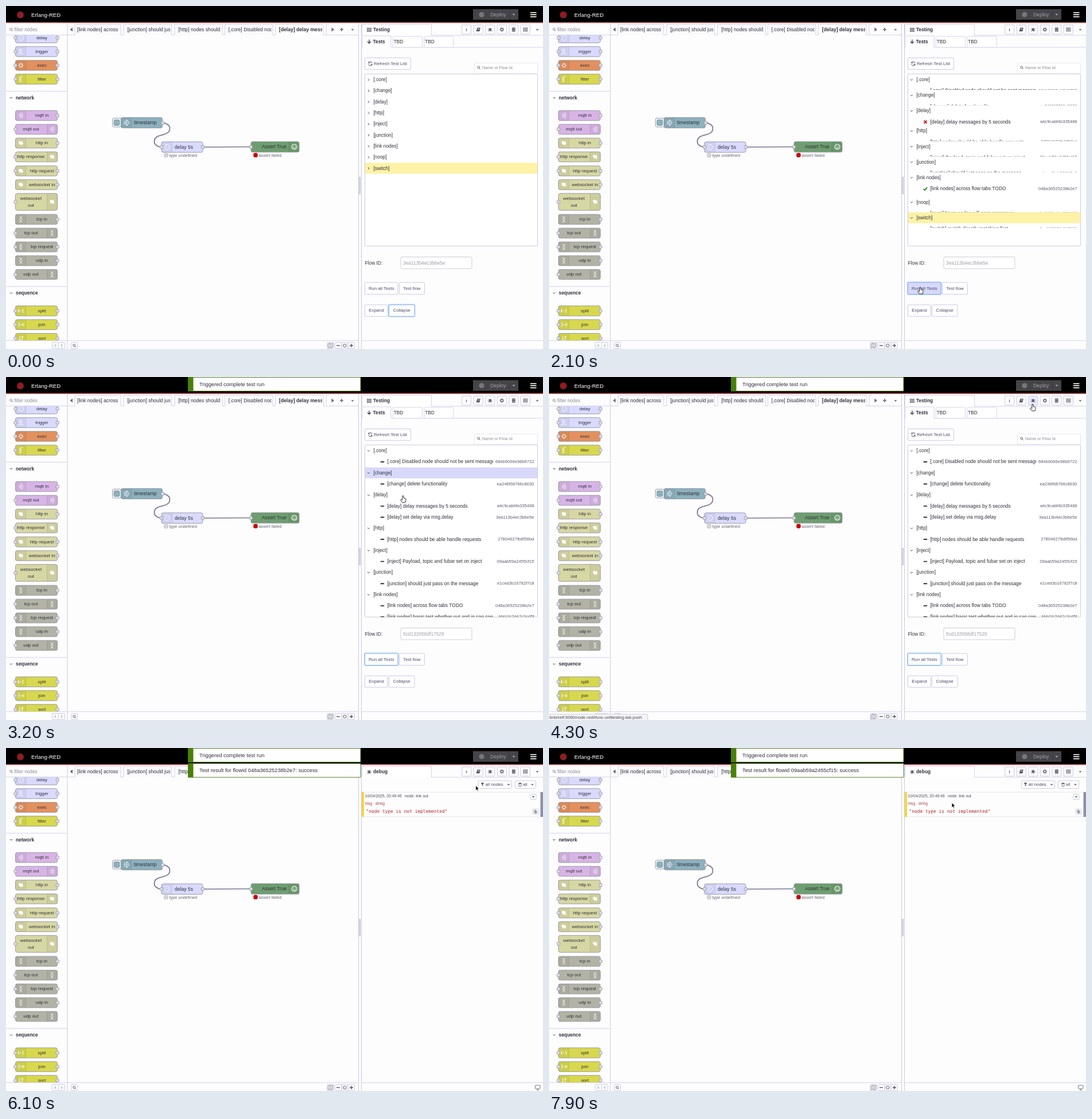
Write an HTML page with a canvas that moves like this. It is 936 by 598 pixels and loops after 8000 ms.

```html
<!DOCTYPE html>
<html lang="en">
<head>
<meta charset="utf-8">
<title>Flow editor test run</title>
<style>
html, body { margin: 0; width: 100%; height: 100%; overflow: hidden; background: #fdfdfe; }
canvas { display: block; width: 936px; height: 598px; }
</style>
</head>
<body>
<canvas id="stage"></canvas>
<script>
const W = 936, H = 598, LOOP = 8000;
const stage = document.getElementById('stage'), c = stage.getContext('2d');
const dpr = window.devicePixelRatio || 1;
stage.width = W * dpr;
stage.height = H * dpr;

const SANS = '"Liberation Sans", Arial, sans-serif', MONO = '"DejaVu Sans Mono", monospace';
const LINE = '#d3d3ec', EDGE = '#c4c4e4', INK = '#30303c', BG = '#fdfdfe', HOVER = '#d8d8fb', FOCUS = '#7fb0f5';

// --- drawing helpers ---
function text(s, x, y, size = 8.4, color = INK, o = {}) {
  c.font = `${o.bold ? 'bold ' : ''}${size}px ${o.mono ? MONO : SANS}`;
  c.textAlign = o.align || 'left';
  c.textBaseline = 'middle';
  c.fillStyle = color;
  c.fillText(s, x, y);
}
function rect(x, y, w, h, fill) {
  c.fillStyle = fill;
  c.fillRect(x, y, w, h);
}
function box(x, y, w, h, fill, stroke = EDGE, r = 1, lw = 0.9) {
  c.beginPath();
  c.roundRect(x, y, w, h, r);
  if (fill) { c.fillStyle = fill; c.fill(); }
  c.strokeStyle = stroke;
  c.lineWidth = lw;
  c.stroke();
}
function disc(x, y, r, fill) {
  c.fillStyle = fill;
  c.beginPath();
  c.arc(x, y, r, 0, 7);
  c.fill();
}
function path(d, x, y, stroke, lw = 1, fill, scale = 1) {
  const p = new Path2D(d);
  c.save();
  c.translate(x, y);
  c.scale(scale, scale);
  if (fill) { c.fillStyle = fill; c.fill(p); }
  if (stroke) { c.strokeStyle = stroke; c.lineWidth = lw; c.stroke(p); }
  c.restore();
}
function clipped(x, y, w, h, draw) {
  c.save();
  c.beginPath();
  c.rect(x, y, w, h);
  c.clip();
  draw();
  c.restore();
}
const hline = (x, y, x2, color = LINE) => rect(x, y, x2 - x, 1, color);
const vline = (x, y, y2, color = LINE) => rect(x, y, 1, y2 - y, color);
const caret = (x, y, color = '#666678') => path('M-2.5-1.2H2.5L0 1.6Z', x, y, null, 0, color);
const chevron = (x, y, open) => path(open ? 'M-2-1L0 1 2-1' : 'M-1-2L1 0-1 2', x, y, '#444454', 1);
const swing = x => 0.5 - Math.cos(Math.PI * Math.min(1, Math.max(0, x))) / 2;

const ICON = {
  clock: 'M-3-3.4A4.5 4.5 0 1 1-4.5 0M0 .5L-3-2.5',
  pulse: 'M-5 4H-2V-4H1V4H4',
  gear: 'M-2.6 0A2.6 2.6 0 1 0 2.6 0A2.6 2.6 0 1 0-2.6 0M0-4.5V-2.6M0 4.5V2.6M-4.5 0H-2.6M4.5 0H2.6M-3.2-3.2L-2-2M3.2 3.2L2 2M3.2-3.2L2-2M-3.2 3.2L-2 2',
  filter: 'M3-4.5H0V4.5H-3M-2-4.5V3',
  waves: 'M-3-2.5Q-1 0-3 2.5M-1-4Q2 0-1 4M1-5.5Q5 0 1 5.5',
  globe: 'M-4.5-1L-2-4 1-2.5 3.5-3.5 2.5-1 4 0 2 4 0 2-1 3.5Z',
  bridge: 'M-2.5-5.5Q1-2.5-2.5 0Q1 2.5-2.5 5.5M2-5.5Q-1.5-2.5 2 0Q-1.5 2.5 2 5.5',
  split: 'M-5-2.5V2.5M-3.5-2.5V2.5M-1 0H1M2-2.5H5M2 0H5M2 2.5H5',
  join: 'M-5-2.5H-2M-5 0H-2M-5 2.5H-2M-1 0H1.5M3-2.5V2.5M5-2.5V2.5',
  sort: 'M-2-4V4M-4 2L-2 4 0 2M2.5 4V-4M.5-2L2.5-4 4.5-2',
  arrow: 'M-4.5-2.4H.3V-5.5L4.5 0 .3 5.5V2.4H-4.5M-4.5 0H2.5',
  lens: 'M-2.2-.5A1.9 1.9 0 1 0 1.6-.5A1.9 1.9 0 1 0-2.2-.5M1 1L2.8 2.8',
  bug: 'M-3.5-2.4L-1.5-1M3.5-2.4L1.5-1M-4 .7H4M-3.5 3.5L-1.5 2M3.5 3.5L1.5 2',
  grid: 'M-4-2.5H-1.6M-1.2-2.5H1.2M1.6-2.5H4M-4 0H-1.6M-1.2 0H1.2M1.6 0H4M-4 2.5H-1.6M-1.2 2.5H1.2M1.6 2.5H4',
  tick: 'M-3.2.2L-1 2.3 3.2-2.3',
  cross: 'M-2.4-2.6L2.4 2.6M2.4-2.6L-2.4 2.6',
  dash: 'M-3.2 0H3.2',
  hand: 'M-1.1 1Q0-1 1.1 1V4.2L4.2 5.3Q5.6 6 5 8.4L4 12H-1.4L-4.4 7.6Q-4.2 5.8-1.1 7.6Z',
  pointer: 'M0 0V9.2L2 7.4 3.4 10.4 4.9 9.7 3.5 6.7H6.2Z'
};
function bug(x, y) {
  path(ICON.bug, x, y, '#555566', 0.8);
  path('M-1.6-1.2Q0-4.6 1.6-1.2V1.8Q0 4.4-1.6 1.8Z', x, y, null, 0, '#555566');
}

// --- static editor ---
const LILAC = '#dadaff', SAND = '#d7d7a4', GREY = '#b2b2a5', LIME = '#d8d84e', PINK = '#d8b4e6';
const palette = [
  [55.5, 'delay', LILAC, 'clock', 'io'], [79.5, 'trigger', LILAC, 'pulse', 'io'],
  [103.5, 'exec', '#e2905e', 'gear', 'io'], [127.5, 'filter', LIME, 'filter', 'io'],
  [191, 'mqtt in', PINK, 'waves', 'o'], [215, 'mqtt out', PINK, 'waves', 'i'],
  [239, 'http in', SAND, 'globe', 'o'], [263, 'http response', SAND, 'globe', 'i'],
  [287.5, 'http request', SAND, 'globe', 'io'], [311.5, 'websocket in', SAND, 'globe', 'o'],
  [341.5, 'websocket\nout', SAND, 'globe', 'i'],
  [372, 'tcp in', GREY, 'bridge', 'o'], [396, 'tcp out', GREY, 'bridge', 'i'],
  [420, 'tcp request', GREY, 'bridge', 'io'], [444, 'udp in', GREY, 'bridge', 'o'],
  [468, 'udp out', GREY, 'bridge', 'i'],
  [531.5, 'split', LIME, 'split', 'io'], [555.5, 'join', LIME, 'join', 'io'], [579.5, 'sort', LIME, 'sort', 'io']
];
const port = (x, y) => box(x - 2.7, y - 2.7, 5.4, 5.4, '#dcdce4', '#9292a4', 1.5, 0.8);

function nodeShape(x, y, w, h, color, icon, right) {
  box(x, y - h / 2, w, h, color, '#9494a2', 3, 0.9);
  const ix = right ? x + w - 18.5 : x;
  rect(ix, y - h / 2 + 0.4, 18.5, h - 0.8, 'rgba(0,0,0,.05)');
  vline(right ? ix : ix + 18, y - h / 2 + 1, y + h / 2 - 1, 'rgba(0,0,0,.08)');
  const solid = icon === 'globe';
  path(ICON[icon], ix + 9.5, y, solid ? null : 'rgba(255,255,255,.9)', 1, solid ? '#fff' : null);
}
function drawPalette() {
  clipped(0, 51, 107, 532, () => {
    for (const [y, label, color, icon, ports] of palette) {
      const lines = label.split('\n'), right = ports === 'i';
      nodeShape(16.5, y, 73, lines.length > 1 ? 29.5 : 17.5, color, icon, right);
      lines.forEach((s, i) =>
        text(s, right ? 43.5 : 62.5, y + (i - (lines.length - 1) / 2) * 12 + 0.2, 7.9, INK, { align: 'center' }));
      if (ports.includes('i')) port(16.5, y);
      if (ports.includes('o')) port(89.7, y);
    }
    for (const [y, name] of [[160, 'network'], [500.5, 'sequence']]) {
      hline(0, y - 12, 107);
      chevron(9, y, true);
      text(name, 17, y + 0.3, 8.4, INK, { bold: true });
    }
  });
  path(ICON.lens, 9, 41, '#777788', 0.9);
  text('filter nodes', 14.5, 41.3, 8.2, '#8c8c96');
  hline(0, 50, 107);
  vline(106.5, 30, H, '#c9c9dc');
  box(80.5, 586.5, 11, 10.5, '#fff');
  box(91.5, 586.5, 11, 10.5, '#fff');
  path('M-1.5-.4L0-1.8 1.5-.4M-1.5 1.8L0 .4 1.5 1.8', 86, 592, '#666677', 0.7);
  path('M-1.5-1.8L0-.4 1.5-1.8M-1.5.4L0 1.8 1.5.4', 97, 592, '#666677', 0.7);
}
function drawHeader() {
  rect(0, 0, W, 28, '#000');
  rect(0, 28, W, 1.4, '#b82222');
  disc(25, 15.5, 6, '#8f1d22');
  text('Erlang-RED', 44, 16.3, 9.6, '#fff');
  rect(814, 5.5, 79, 18.5, '#444449');
  vline(877, 6, 24, '#38383c');
  disc(829, 15, 4.5, '#77777a');
  text('Deploy', 844, 15.3, 8.8, '#a0a0a4');
  caret(885, 15, '#aaaaae');
  for (const y of [10.7, 14.3, 17.9]) rect(914, y, 10.5, 1.7, '#fff');
}
function drawTabs() {
  hline(107, 50, 615);
  path('M2-3.5V3.5L-2.5 0Z', 114, 41, null, 0, '#666678');
  const tabs = [
    [120, '[link nodes] across flow tabs'], [205, '[junction] should just pass'],
    [294, '[http] nodes should be able'], [381.5, '[.core] Disabled node'], [469.5, '[delay] delay messages']
  ];
  tabs.forEach(([x, s], i) => {
    const active = i === 4, w = i ? 83.5 : 80;
    path(`M0 19V0H${w}V19`, x, 32, LINE, 1, active ? '#fff' : '#fbfbfe');
    if (active) rect(x + 0.6, 50, w - 1.2, 1, '#fff');
    clipped(x, 32, w - 2, 18, () => text(s, x + (i ? 6.3 : 4), 41.8, 8.65, INK, { bold: active }));
  });
  path('M0 19V0H5', 558, 32, LINE);
  path('M-2-3.5V3.5L2.5 0Z', 569.5, 41, null, 0, '#666678');
  path('M-3 0H3M0-3V3', 585, 41, '#666678', 1.6);
  caret(604, 41.5);
}
function drawFlow() {
  const wire = '#77778e';
  path('M273 203.7C279 203.7 285.5 208.2 285.5 212.7S285.5 221.7 272 224.8S258.5 232.5 258.5 237S264.7 246 271 246',
    0, 0, wire, 1.7);
  path('M343 246L427 245.5', 0, 0, wire, 1.7);
  box(185.5, 195.5, 15, 15.5, '#f6f6fb', '#9494a2', 2.5);
  box(188, 198.3, 10, 10, '#8db0be', '#7897a3', 2);
  nodeShape(200.5, 203.5, 72, 18.3, '#8db0be', 'arrow');
  text('timestamp', 223, 203.9, 8.6);
  port(273, 203.7);
  nodeShape(271, 246, 72, 18.3, LILAC, 'clock');
  text('delay 5s', 294, 246.4, 8.6);
  port(271, 246);
  port(343, 246);
  nodeShape(427, 245.7, 84, 18.3, '#6e9e70', null, true);
  path('M-4.5 0A4.5 4.5 0 1 0 4.5 0A4.5 4.5 0 1 0-4.5 0M-2.4 1Q0 4 2.4 1M-1.6-2V-.6M1.6-2V-.6', 502.5, 245.5, '#fff', 1.1);
  text('Assert True', 446, 246, 8.4);
  port(427, 245.7);
  box(275.7, 257, 6.6, 6.6, '#d6d6d6', '#c4c4c4', 1.5);
  text('type undefined', 284.5, 261, 7.4, '#666672');
  box(431.8, 256.7, 6.4, 6.6, '#cc0000', '#b80000', 1.5);
  text('assert failed', 440.5, 260.7, 7.4, '#666672');
}
function drawFrame() {
  hline(107, 583, 615);
  hline(0, 583, 107);
  box(113.5, 586.5, 11, 11, '#fff');
  path(ICON.lens, 119, 592, '#555566', 1);
  [560, 573.5, 585, 596.5].forEach(x => box(x, 586.5, 11, 11, '#fff'));
  path('M-4-3L-1.3-4 1.3-3 4-4V3L1.3 4-1.3 3-4 4ZM-1.3-4V3M1.3-3V4', 565.5, 592, '#666677', 0.7);
  path('M-3 0H3', 579, 592, '#555566', 1.4);
  path('M-2.7 0A2.7 2.7 0 1 0 2.7 0A2.7 2.7 0 1 0-2.7 0', 590.4, 592, '#555566', 1);
  path('M-3 0H3M0-3V3', 602, 592, '#555566', 1.4);
  vline(614, 30, H, '#c9c9dc');
  vline(619, 30, H, '#c9c9dc');
  box(616, 298, 1.4, 30, '#fff', '#a8a8ba', 0.5, 0.8);
}

// --- sidebar ---
function drawSideHead(debug, cur) {
  path('M0 19V0H121V19', 620.5, 32, LINE, 1, '#fff');
  hline(741, 50.5, W);
  if (debug) bug(633, 41.5);
  else path(ICON.grid, 633, 41.5, '#444455', 1.7);
  text(debug ? 'debug' : 'Testing', 640, 41.8, 8.4, INK, { bold: true });
  const xs = [802.7, 823.2, 843.8, 864.3, 884.8, 905.3], tone = '#555566';
  for (const x of xs) box(x - 8, 33, 16, 16, inside(cur, x - 8, 33, 16, 16) ? '#ececfd' : '#fff');
  text('i', xs[0], 41.3, 8, tone, { bold: true, align: 'center' });
  path('M-2-3.5H4L2.5 3.5H-4Z', xs[1], 41, null, 0, tone, 0.9);
  path('M-.8-2H2.4M-1.2-.4H2', xs[1], 41, '#fff', 0.7, null, 0.9);
  bug(xs[2], 41);
  path(ICON.gear, xs[3], 41, tone, 1.5, null, 0.8);
  for (const y of [37.6, 40.1, 42.6]) rect(xs[4] - 3, y, 6, 1.9, tone);
  path(ICON.grid, xs[5], 41, tone, 1.7);
  caret(926, 41.5);
}

const groups = [
  ['.core', ['Disabled node should not be sent messages', '684b9066e98b9722']],
  ['change', ['delete functionality', 'ea246f68766c8630']],
  ['delay', ['delay messages by 5 seconds', 'a4c9cabf4b335488', 'cross'], ['set delay via msg.delay', '3ea113b4ec3b6e5e']],
  ['http', ['nodes should be able handle requests', '27804627fb8f56bd']],
  ['inject', ['Payload, topic and fubar set on inject', '09aab59a2455cf15']],
  ['junction', ['should just pass on the message', 'e1ced3b16782f7c8']],
  ['link nodes', ['across flow tabs TODO', '048a36525238b2e7', 'tick'],
    ['basic test whether out and in can connect', 'bbb1fc2d47c3cd5f'], ['return to the link call', '7c2e90b1f4a85d36']],
  ['noop', ['Noop nodes will pass messages', '2e9929a9ad23918f']],
  ['switch', ['switch directly matching first', '5cd133958df17529']]
];
const statusColor = { tick: '#1b8a1b', cross: '#cc1616', dash: INK };
const ROW = 19.3;

function drawTree(t, next) {
  const open = swing((t - 2013) / 200), reset = t > 2250;
  let y = 119;
  const back = fill => {
    if (fill) rect(626, y, 300.5, ROW - 0.3, fill);
    else if (inside(next, 626, y, 300, ROW)) rect(626, y, 300.5, ROW - 0.3, HOVER);
  };
  for (const [name, ...tests] of groups) {
    back(name === 'switch' ? '#fdf2a6' : null);
    chevron(632, y + ROW / 2, t > 2013);
    text(`[${name}]`, 640.5, y + ROW / 2 + 0.2);
    y += ROW;
    const top = y, h = tests.length * ROW * open;
    if (open) clipped(626, top, 300, h, () => {
      for (const [title, id, mark] of tests) {
        back();
        const m = y + ROW / 2, kind = reset ? 'dash' : mark || 'dash';
        path(ICON[kind], 656, m, statusColor[kind], 1.9);
        clipped(660, y, 189, ROW, () => text(`[${name}] ${title}`, 664.5, m + 0.2, 8.45));
        text(id, 920.5, m, 7.6, '#5c5c70', { align: 'right' });
        y += ROW;
      }
    });
    y = top + h;
  }
}
function button(label, x, y, w, h, cur, focus, tx = x + w / 2) {
  const over = inside(cur, x, y, w, h);
  if (focus) box(x - 0.5, y - 0.5, w + 1, h + 1, null, '#b9d5fb', 2, 2);
  box(x, y, w, h, over ? HOVER : '#fff', focus ? FOCUS : EDGE, 1.5);
  text(label, tx, y + h / 2 + 0.2, 7.8, '#4a4a70', { align: 'center' });
}
function drawTesting(t, cur, next) {
  hline(671, 71.5, W);
  path('M0 20V0H50V20', 621, 52, LINE);
  path('M0-3.5V2.5M-3 0L0 3 3 0', 633, 62, '#444455', 1.4);
  text('Tests', 639.5, 62.5, 8.4, INK, { bold: true });
  for (const x of [674.5, 729]) {
    box(x, 53, 51, 19, '#fff', LINE);
    text('TBD', x + 1.2, 62.5, 8.3);
  }
  button('Refresh Test List', 625.5, 90.5, 80, 20, cur, false, 670);
  path('M3-1A3 3 0 0 0-2.5-2M-3-3.5V-1H-1M-3 1A3 3 0 0 0 2.5 2M3 3.5V1H1', 635, 100.5, '#444455', 1);
  box(816.5, 99.5, 110, 18.5, '#fff', '#e4e4f2');
  path(ICON.lens, 824, 107.5, '#666678', 1);
  text('Name or Flow Id', 830, 108, 7.2, '#8c8c96');
  box(625.5, 118.5, 301, 300, '#fff', '#c8c8d8', 1.5);
  clipped(626, 119, 300.5, 299.5, () => drawTree(t, next));
  text('Flow ID:', 625.5, 448.2);
  box(688, 437.5, 124, 20.5, '#fff', '#c8c8d4', 2);
  text(t < 2600 ? '3ea113b4ec3b6e5e' : '5cd133958df17529', 692, 448.3, 8.4, '#a0a0a8');
  button('Run all Tests', 625.5, 482, 57.5, 20.5, cur, t > 1980);
  button('Test flow', 685.5, 482, 44, 20.5, cur);
  button('Expand', 625.5, 521, 40, 20, cur);
  button('Collapse', 667.5, 521, 44.5, 20, cur, t < 1980);
}
function drawDebug(t) {
  box(823.5, 57, 58, 13.5, '#fff');
  path('M-3-3H3L.8 0V3L-.8 2V0Z', 830.5, 63.5, null, 0, '#555566');
  text('all nodes', 835.5, 63.8, 7.8, '#4a4a70');
  caret(876, 64);
  box(887.5, 57, 36, 13.5, '#fff');
  path('M-2.2-1.5H2.2L1.7 3H-1.7ZM-3-2.5H3M-1-3.4H1', 896, 64, '#555566', 0.8);
  text('all', 901, 63.8, 7.8, '#4a4a70');
  caret(917.5, 64);
  box(922.5, 588, 8.5, 6, '#fff', '#666678', 0.8, 0.9);
  path('M-2 0H2M0-1.5V0', 926.8, 596, '#666678', 1);
  if (t < 6000) return;
  hline(620, 76.5, W, '#e6e6f0');
  hline(620, 119.5, W, '#e6e6f0');
  rect(620, 77, 4, 43, '#fbd23c');
  rect(931.5, 77, 4.5, 43, '#8f8faa');
  text('10/04/2025, 20:49:46', 625.5, 84.5, 6.8, '#4c4c56');
  text('node: link out', 695, 84.5, 6.9, '#4c4c56');
  text('msg : string', 625.5, 96.7, 6.7, '#a64040');
  text('"node type is not implemented"', 627.5, 111, 7.87, '#b52020', { mono: true });
  box(914, 80.5, 10, 9, '#fff');
  caret(919, 85.2);
  box(918, 106.5, 9.5, 9, '#fff');
  path('M-2-2.5H1V1.5H-2ZM-.5-1H2.3V2.7H-.5Z', 922.7, 111, '#555566', 0.7);
}

// --- notifications, status line, pointer ---
const toasts = [
  ['Triggered complete test run', 2350, 1e5],
  ['Test result for flowid 048a36525238b2e7: success', 4650, 7400],
  ['Test result for flowid 09aab59a2455cf15: success', 6950, 1e5]
];
function drawToasts(t) {
  let y = 0.5;
  for (const [s, from, to] of toasts) {
    const p = swing((t - from) / 300) * (1 - swing((t - to) / 300));
    if (!p) continue;
    const h = 24 * p;
    clipped(316, y - 1, 304, h + 2, () => {
      box(317.5, y, 300.5, h, '#fff', '#55802a', 0, 1);
      rect(317, y, 9.5, h, '#4a7f08');
      clipped(327, y, 290, h - 0.5, () => text(s, 337, y + 7 * p + 5.7, 9.3));
    });
    y += 26.6 * p;
  }
}
function drawStatusLine(t) {
  if (t < 3750 || t > 5900) return;
  const tail = t < 4400 ? 'func-unittesting-tab-push' : 'debug', w = t < 4400 ? 173 : 109;
  box(-1, 588, w, 11, '#f5f5f8', '#c6c6d0', 1);
  text('tintshelf:9090/node-red#' + tail, 1, 594, 7.4, '#444450');
}

const track = [
  [1300, 650, 606], [1900, 647, 490], [2400, 647, 490], [3200, 692, 207], [3700, 694, 44],
  [4200, 843, 47], [4500, 843, 47], [4800, 844, 42], [5800, 844, 42], [6700, 768, 111], [7150, 768, 111], [7900, 702, 95], [8200, 700, 95]
];
function pointerAt(t) {
  const i = track.findIndex(k => k[0] > t);
  if (i < 1) return null;
  const [t0, x0, y0] = track[i - 1], [t1, x1, y1] = track[i], p = (t - t0) / (t1 - t0);
  return { x: x0 + (x1 - x0) * p, y: y0 + (y1 - y0) * p };
}
function inside(p, x, y, w, h) {
  return p && p.x >= x && p.x < x + w && p.y >= y && p.y < y + h;
}

function draw(t) {
  const cur = pointerAt(t), debug = t >= 4700;
  c.setTransform(dpr, 0, 0, dpr, 0, 0);
  rect(0, 0, W, H, BG);
  drawPalette();
  drawTabs();
  drawFlow();
  drawFrame();
  hline(620, 583, W);
  drawSideHead(debug, cur);
  if (debug) drawDebug(t);
  else drawTesting(t, cur, pointerAt(t + 100)); // row hover runs slightly ahead of the pointer
  drawHeader();
  drawToasts(t);
  drawStatusLine(t);
  if (!cur) return;
  if (debug) path(ICON.pointer, cur.x, cur.y, '#fff', 1, '#000');
  else path(ICON.hand, cur.x, cur.y, '#111', 0.9, '#fff');
}

const start = performance.now();
function loop() {
  draw((performance.now() - start) % LOOP);
  requestAnimationFrame(loop);
}
loop();
</script>
</body>
</html>
```
